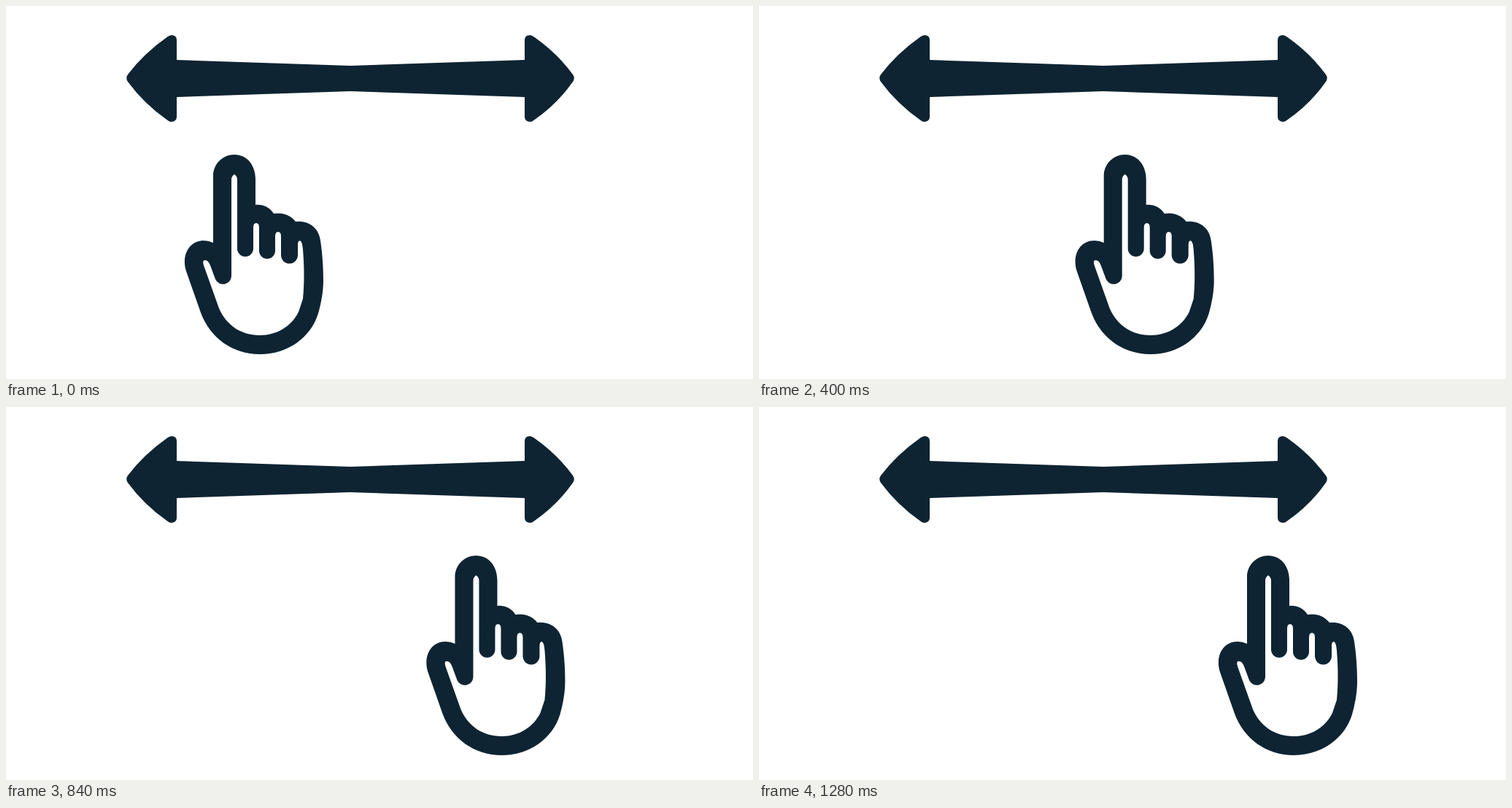
These frames come from a looping animation (1024 px wide and 512 px high, 4680 ms). An HTML page:

```html
<!DOCTYPE html>
<html lang="en">
<head>
<meta charset="utf-8">
<title>Swipe gesture</title>
<style>
  html, body { margin: 0; width: 100%; height: 100%; overflow: hidden; background: #fff; }
  svg { display: block; width: 100%; height: 100%; fill: #0e2433; }
</style>
</head>
<body>
<svg viewBox="0 0 1024 512">
  <path d="M234 74 V47 Q234 40 227 40 Q224 40 221 42.500 Q189 65 167 94 Q163.500 99 167 104
    Q189 134 221 156.500 Q224 159 227 159 Q234 158 234 152 V125 L472 117 L711 125
    V152 Q711 158 718 159 Q721 159 724 156.500 Q756 134 777 104 Q780.500 99 777 94
    Q756 65 724 42.500 Q721 40 718 40 Q711 40 711 47 V74 L472 82 Z"/>
  <path id="hand" fill-rule="evenodd" d="
    M284 325 V233 C284 217 297 204 313 204 C330 204 342 218 342 238 V273
    C352 272 361 276 367 285 C379 283 390 287 397 296 C414 294 429 304 431 322
    C434 342 435 360 435 377 C435 392 432 408 428 422 C418 455 386 478 348 478
    C311 478 280 456 267 421 L247 364 C240 342 251 322 271 322 Q278 322 284 325 Z
    M309 371 V238 Q309 234 313 231 Q317 234 317 238 V333 A11 11 0 0 0 339 333
    V304 Q339 298 343 298 Q347 298 347 304 V336 A11 11 0 0 0 369 336
    V316 Q369 310 373 310 Q377 310 377 316 V342 A11.500 11.500 0 0 0 400 342
    V328 Q400 322 403 322 Q406 323 407 334 C409 360 409 380 407 402 L401 420
    C391 440 371 452 348 452 C322 452 302 438 292 415 L271 356 Q269 349 272 349
    Q277 348 280 356 L287 375 A11.500 11.500 0 0 0 309 371 Z"/>
</svg>
<script>
  const LOOP = 4680, STEP = 40, TURN = 13, LAST = 32;
  const hand = document.getElementById('hand');

  // A quick swipe, then a slow glide that settles to rest.
  function shift(n) {
    if (n <= TURN) return n * (2.2 + n * (2.503 - 0.0836 * n));
    const u = (n - TURN) / (LAST - TURN);
    return 268 + 117 * u * (1.22 + u * (0.44 - 0.66 * u));
  }

  const start = performance.now();
  function draw() {
    const time = (performance.now() - start) % LOOP;
    const n = Math.min(LAST, Math.floor(time / STEP));
    hand.setAttribute('transform', `translate(${shift(n).toFixed(2)} 0)`);
    requestAnimationFrame(draw);
  }
  draw();
</script>
</body>
</html>
```
